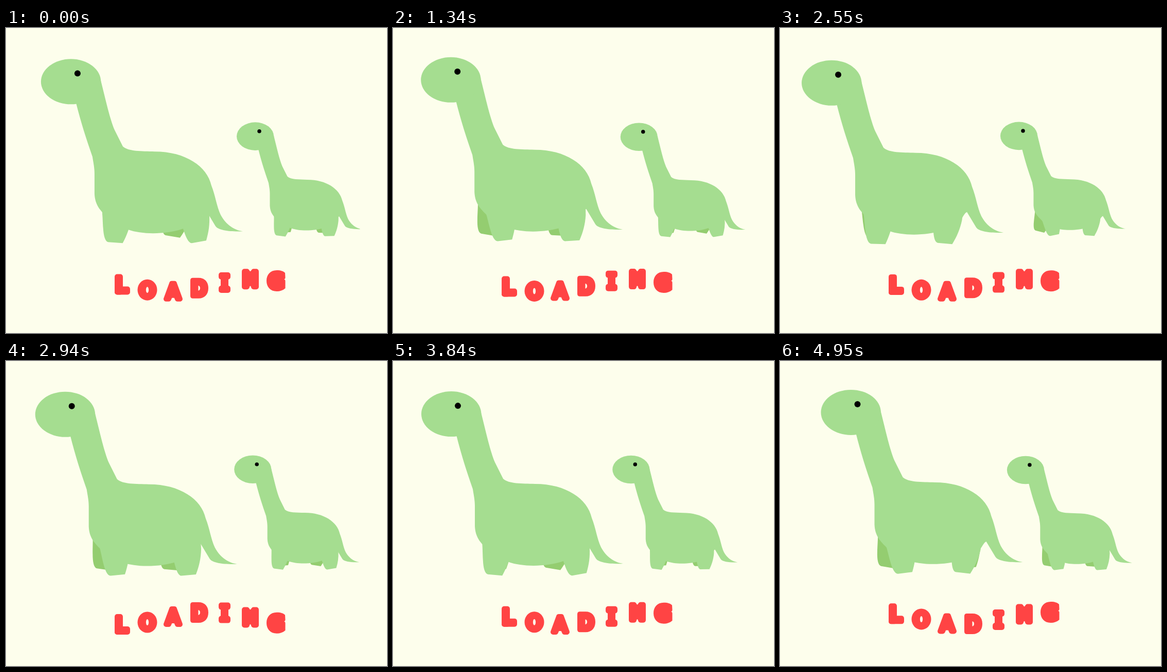
An HTML page with a canvas for the animation above (5050 ms loop, 740x593 px).

```html
<!DOCTYPE html>
<html lang="en">
<head>
<meta charset="utf-8">
<title>Loading</title>
<style>
  html, body { margin: 0; width: 740px; height: 593px; overflow: hidden; background: #fdfeec; }
  canvas { display: block; }
</style>
</head>
<body>
<canvas id="stage" width="740" height="593" role="img" aria-label="LOADING"></canvas>
<script>
const ctx = document.getElementById('stage').getContext('2d');
const LOOP = 5050, STEP = 754, TAU = Math.PI * 2;
const COLOR = { back: '#fdfeec', light: '#a5dd90', dark: '#94cd70', red: '#ff4444', eye: '#000' };

// The picture advances in held steps: [first, last, count] per run.
const RUNS = [[60, 510, 7], [600, 1100, 8], [1200, 1340, 3], [1440, 1710, 5], [1800, 2280, 8],
  [2340, 2550, 4], [2610, 2820, 4], [2880, 3330, 8], [3420, 3930, 8], [3990, 4350, 6],
  [4410, 4470, 2], [4530, 4950, 7]];
const stamps = [0];
for (const [first, last, count] of RUNS)
  for (let i = 0; i < count; i++) stamps.push(Math.round(first + (last - first) * i / (count - 1)));

const BODY = new Path2D(`M135 144 C145 184 155 214 167 249 C169 262 171 270 171 282 L171 321
  C172 342 181 352 192 363 C204 377 218 386 237 391 C262 400 308 401 343 389
  C362 383 374 372 379 365 C382 360 384 356 388 354 L406 384 C412 393 438 395 459 394
  C438 391 424 377 416 362 C408 345 406 325 398 305 C390 268 348 239 288 239
  C262 238 237 239 226 229 L210 197 C201 176 193 140 183 100 Z`);
const FRONT_LEG = new Path2D(`M198 322 L185 347 C187 362 187 377 188 388
  C189 403 192 414 198 415 L226 417 C234 402 240 385 243 370 L246 322 Z`);
const REAR_LEG = new Path2D(`M328 325 L336 368 C344 390 350 417 360 417
  L388 412 C393 395 395 380 394 362 L388 318 Z`);

const FRONT = { path: FRONT_LEG, x: 216, y: 322, rest: 129, length: 94 };
const REAR = { path: REAR_LEG, x: 357, y: 308, rest: 293, length: 107 };

// foot is the foot's distance from the snout; it sets the swing of the leg.
function drawLeg(leg, foot, color, dx = 0, dy = 0) {
  ctx.save();
  ctx.translate(leg.x + dx, leg.y + dy);
  ctx.rotate((leg.rest - foot) / leg.length);
  ctx.translate(-leg.x, -leg.y);
  ctx.fillStyle = color;
  ctx.fill(leg.path);
  ctx.restore();
}

function ellipse(x, y, rx, ry, color) {
  ctx.fillStyle = color;
  ctx.beginPath();
  ctx.ellipse(x, y, rx, ry, 0, 0, TAU);
  ctx.fill();
}

function drawDino(snoutX, eyeY, scale, front, rear) {
  ctx.save();
  ctx.translate(snoutX, eyeY);
  ctx.scale(scale, scale);
  ctx.translate(-67, -87);
  drawLeg(FRONT, 267 - front, COLOR.dark, -5, -11);
  drawLeg(REAR, 549 - rear, COLOR.dark, -14, -10);
  drawLeg(FRONT, front, COLOR.light);
  drawLeg(REAR, rear, COLOR.light);
  ctx.fillStyle = COLOR.light;
  ctx.fill(BODY);
  ellipse(125.2, 103, 58.2, 44, COLOR.light);
  ellipse(138, 87, 6, 6, COLOR.eye);
  ctx.restore();
}

const swing = (time, peak, period) => Math.cos((time - peak) / period * TAU);

function drawDinos(time) {
  const phase = (time - 600) / STEP * TAU;
  const c = Math.cos(phase), s = Math.sin(phase), bob = Math.sin(2 * phase + 0.08);
  ctx.save();
  ctx.beginPath();
  ctx.rect(0, 54, 687.5, 539);
  ctx.clip();
  drawDino(62 + 20 * swing(time, 305, 2 * STEP), 85.7 + 5.5 * bob, 1,
    135.9 + 10.1 * c - 10.5 * s, 276.7 + 5 * c + 15.5 * s);
  drawDino(437.3 + 12.2 * swing(time, 120, 2 * STEP), 201.5 - 1.7 * bob, 0.62,
    137.4 - 12.9 * c - 11.3 * s, 277.3 + 15.2 * c - 4.2 * s);
  ctx.restore();
}

function block(x, y, w, h, r = 5) {
  ctx.beginPath();
  ctx.roundRect(x, y, w, h, r);
  ctx.fill();
}

function shape(d, outline = 0) {
  const path = new Path2D(d);
  ctx.fill(path);
  if (outline) {
    ctx.lineWidth = outline;
    ctx.stroke(path);
  }
}

const LETTERS = [
  function L() { block(211, 0, 16, 40); block(211, 24, 30, 16); },
  function O() {
    ellipse(274.5, 20.5, 19, 20.5, COLOR.red);
    ellipse(274.5, 20.5, 2.6, 6, COLOR.back);
  },
  function A() { shape('M322 5 H327 L338 35 H333 L330 28 H319 L316 35 H311 Z', 10); },
  function D() {
    shape('M363 0 H374 C386 0 393 8 393 20 C393 32 386 40 374 40 H363 Q358 40 358 35 V5 Q358 0 363 0 Z');
    ctx.fillStyle = COLOR.back;
    shape('M373.5 15 Q377 16 377 20 Q377 24 373.5 25 Z');
  },
  function I() { block(413, 0, 23, 14); block(417, 5, 15, 30, 0); block(413, 26, 23, 14); },
  function N() {
    block(458, 0, 15, 40);
    block(476, 0, 15, 40);
    shape('M470 1 L474.5 5 L479 1 V39 L474.5 33 L470 39 Z');
  },
  function G() {
    shape(`M526 0 C534 0 539 2 542 5 L542.5 14 Q542.5 17 540 17.5 Q542.5 18 542.5 21 V35
      C538 39 532 41 526 41 C513 41 506 32 506 20.5 C506 9 513 0 526 0 Z`);
  }
];

function drawLetters(time) {
  LETTERS.forEach((draw, i) => {
    const angle = (-7 + 0.283 * time + 53 * i) * Math.PI / 180;
    ctx.save();
    ctx.translate(0, 480 + 12 * Math.sin(angle));
    ctx.fillStyle = ctx.strokeStyle = COLOR.red;
    ctx.lineJoin = 'round';
    draw();
    ctx.restore();
  });
}

function render(now) {
  const clock = now % LOOP;
  const time = stamps.findLast(stamp => stamp <= clock);
  ctx.fillStyle = COLOR.back;
  ctx.fillRect(0, 0, 740, 593);
  drawDinos(time);
  drawLetters(time);
}

const start = performance.now();
function tick() {
  render(Math.max(0, performance.now() - start));
  requestAnimationFrame(tick);
}
tick();
</script>
</body>
</html>
```
